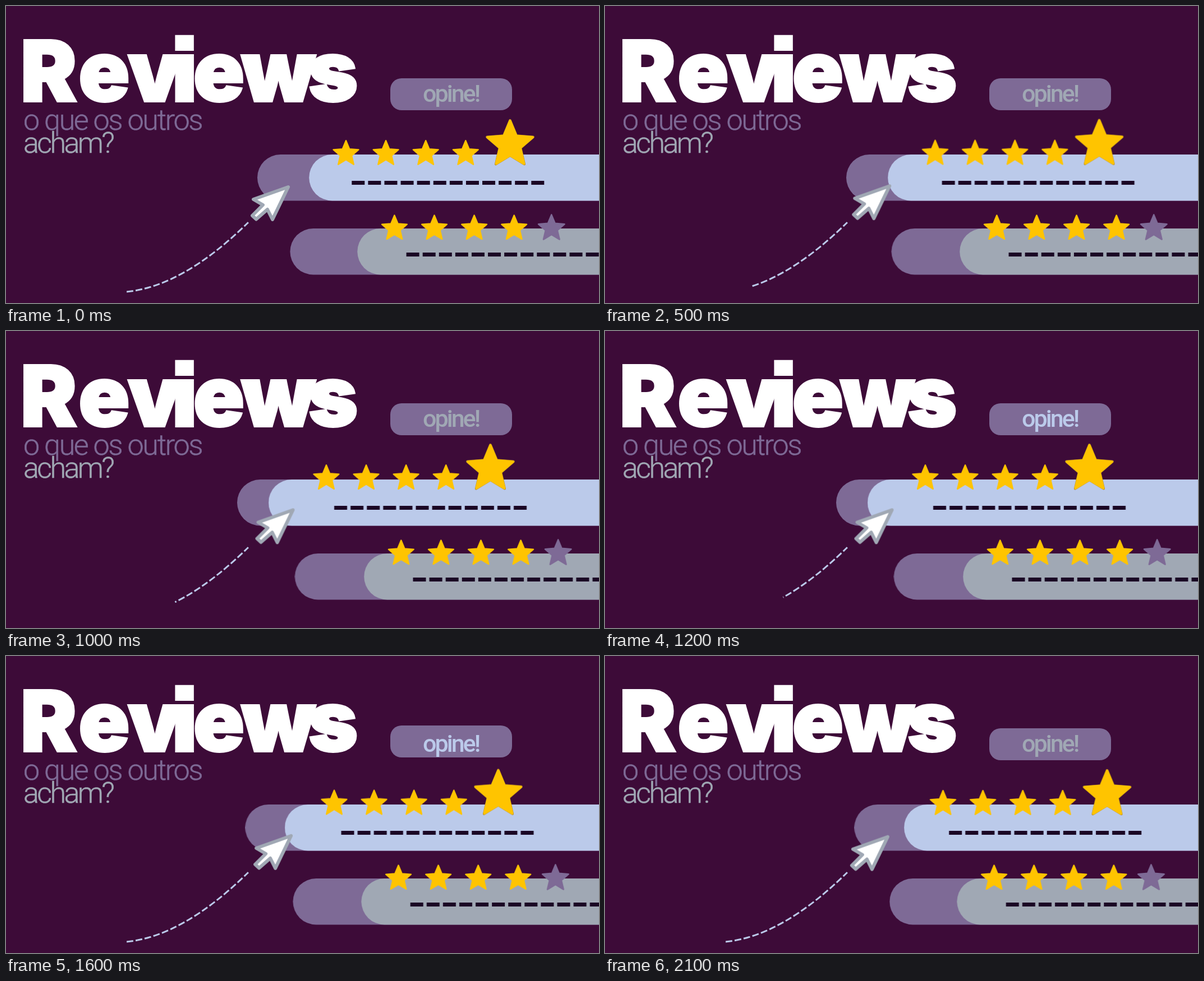
These frames come from a looping animation (1057 by 530 pixels, 2.2 s). An HTML page:

```html
<!DOCTYPE html>
<html lang="pt">
<head>
<meta charset="utf-8">
<title>Reviews</title>
<style>
  :root {
    --plum: #3d0b38;
    --violet: #7e6a96;
    --grey: #a0a8b4;
    --sky: #bbcaea;
    --gold: #ffc400;
    --ink: #1a0524;
  }
  html, body { margin: 0; width: 100%; height: 100%; overflow: hidden; background: var(--plum); }
  svg { display: block; width: 100%; height: 100%; }

  /* Out and back in 22 equal steps */
  .sway { animation: sway 2.2s steps(11) infinite; }
  @keyframes sway { 50% { transform: translate(var(--dx), var(--dy, 0px)); } }

  /* The trail is eaten from its tail, then springs back */
  .trim { stroke-dasharray: 400; animation: trim 2.2s step-end infinite; }
  @keyframes trim {
    0% { stroke-dashoffset: 0; animation-timing-function: steps(12); }
    54.545% { stroke-dashoffset: -109; }
    59.09% { stroke-dashoffset: -75; }
    63.636% { stroke-dashoffset: -40; }
    68.181% { stroke-dashoffset: -12; }
    72.727% { stroke-dashoffset: 0; }
    77.272% { stroke-dashoffset: -4; }
    81.818% { stroke-dashoffset: -9.5; }
    86.363% { stroke-dashoffset: -4; }
    90.909%, 100% { stroke-dashoffset: 0; }
  }

  .pill { fill: var(--violet); animation: bounce 2.2s step-end infinite; }
  @keyframes bounce {
    0% { transform: none; }
    63.636% { transform: translateY(-1px); }
    68.181% { transform: translateY(-3px); }
    72.727% { transform: translateY(-5px); }
    77.272% { transform: translateY(-1px); }
    81.818% { transform: translateY(3.6px); }
    86.363% { transform: translateY(1px); }
    90.909% { transform: translateY(-2px); }
    95.454%, 100% { transform: none; }
  }

  .call { font: 500 43px Roboto, sans-serif; letter-spacing: -3px; fill: var(--grey);
          animation: glow 2.2s step-end infinite; }
  @keyframes glow {
    50% { fill: var(--sky); }
    77.272%, 100% { fill: var(--grey); }
  }

  .title { font: 900 150px Inter, sans-serif; font-feature-settings: "ss07";
           fill: #fff; stroke: #fff; stroke-width: 4; }
  .sub { font: 300 52px Roboto, sans-serif; letter-spacing: -2.4px; stroke-width: .5; }
  .soft { fill: var(--grey); stroke: var(--grey); letter-spacing: -3.6px; }
  .gold { fill: var(--gold); stroke: var(--gold); }
  .edge { fill: #b08428; stroke: #b08428; }
  .dull { fill: var(--violet); stroke: var(--violet); }
  .dashes { stroke: var(--ink); stroke-width: 7; stroke-dasharray: 23 6.09; }
</style>
</head>
<body>
<svg viewBox="0 0 1057 530" preserveAspectRatio="none">
  <defs>
    <polygon id="star" stroke-width="2.4" stroke-linejoin="round"
      points="0,-23.5 6.2,-8.6 22.4,-7.3 10.1,3.3 13.8,19 0,10.6 -13.8,19 -10.1,3.3 -22.4,-7.3 -6.2,-8.6"/>
    <g id="four">
      <use href="#star"/>
      <use href="#star" x="71.1"/>
      <use href="#star" x="142.2"/>
      <use href="#star" x="213.3"/>
    </g>
    <rect id="bar" width="800" height="82.5" rx="41.2"/>
    <path id="line" d="M0 0H343"/>
    <path id="curve" d="M215 510Q316 500 432 386" fill="none"/>
    <mask id="reveal" maskUnits="userSpaceOnUse" x="0" y="0" width="1057" height="530">
      <use href="#curve" class="trim" stroke="#fff" stroke-width="12"/>
    </mask>
  </defs>

  <rect width="1057" height="530" fill="var(--plum)"/>

  <text class="title" y="170" x="26 129.5 217.5 296 334 420 539">Reviews</text>
  <text class="sub dull" x="31" y="221">o que os outros</text>
  <text class="sub soft" x="31" y="262">acham?</text>

  <rect class="pill" x="685" y="129" width="217" height="57" rx="20"/>
  <text class="call" x="743" y="171">opine!</text>

  <g class="sway" style="--dx:-39.6px"><use href="#bar" x="448" y="265" fill="var(--violet)"/></g>
  <g class="sway" style="--dx:-79.6px"><use href="#bar" x="540.2" y="265" fill="var(--sky)"/></g>
  <g class="sway" style="--dx:-34.4px"><use href="#line" class="dashes" x="616.3" y="315.5"/></g>
  <g class="sway" style="--dx:-38.6px;--dy:-1px">
    <use href="#four" class="gold" x="606" y="263.7"/>
    <use href="#star" class="edge" transform="translate(898.5 247.2) scale(1.84)"/>
    <use href="#star" class="gold" transform="translate(898.5 247.2) scale(1.8)"/>
  </g>

  <g class="sway" style="--dx:9.3px"><use href="#bar" x="506.4" y="397" fill="var(--violet)"/></g>
  <g class="sway" style="--dx:13px">
    <use href="#bar" x="626.3" y="397" fill="var(--grey)"/>
    <use href="#line" class="dashes" x="713.6" y="443.5"/>
    <use href="#four" class="gold" x="692.4" y="397"/>
    <use href="#star" class="dull" transform="translate(972.3 396.8) scale(1.04)"/>
  </g>

  <g mask="url(#reveal)">
    <use href="#curve" stroke="var(--sky)" stroke-width="3" stroke-dasharray="12 4.3"/>
  </g>
  <polygon class="sway" style="--dx:9.3px;--dy:-4px" fill="#fff" stroke="var(--grey)"
    stroke-width="6" stroke-linejoin="round"
    points="503,323 441,345 458,355 439,374 446,380.5 466,363 475,381"/>
</svg>
</body>
</html>
```
